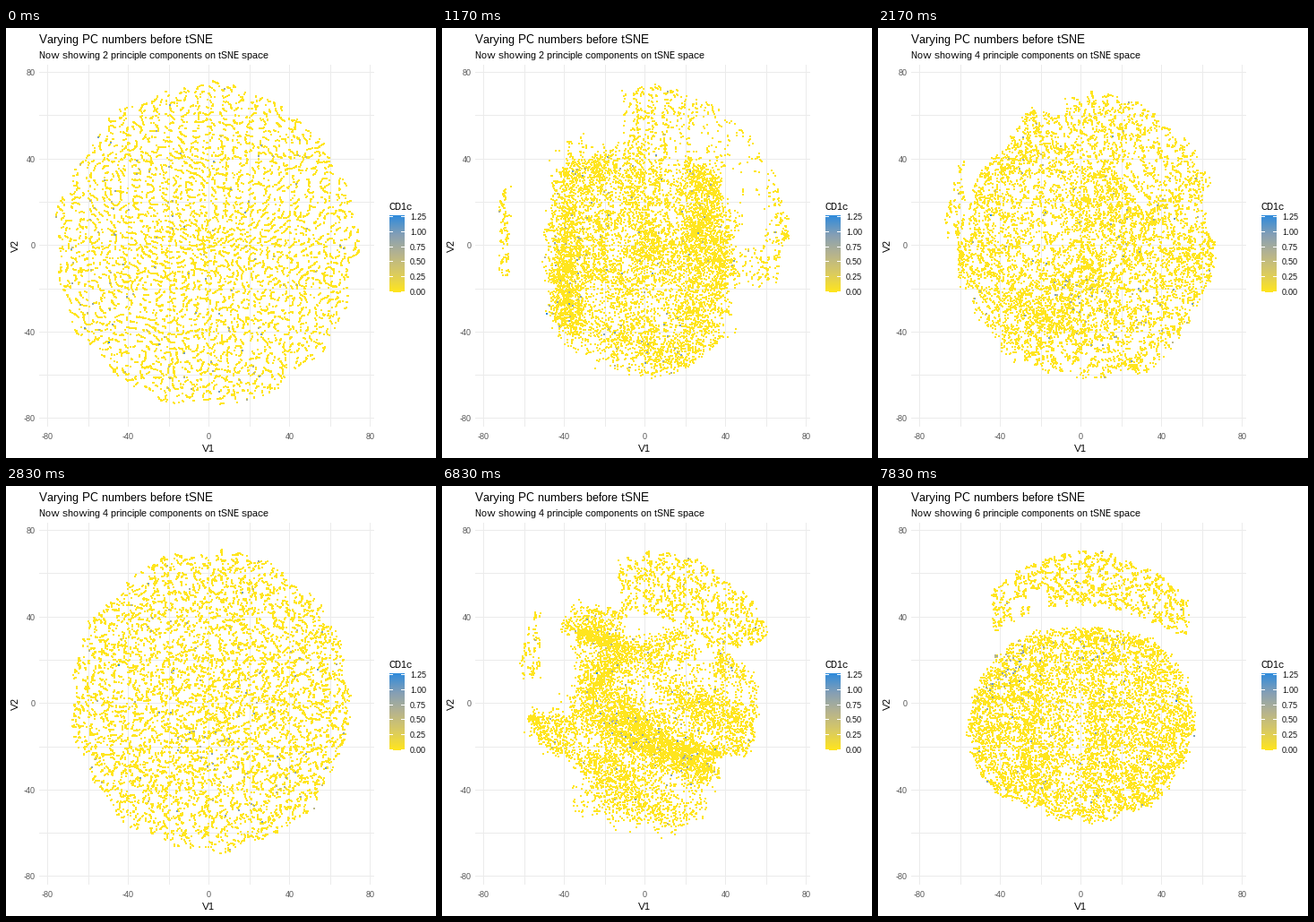
Write a matplotlib script that moves like this. It is 480 by 480 pixels and loops after 8 s.

```python
import numpy as np
import matplotlib.pyplot as plt
from matplotlib.animation import FuncAnimation
from matplotlib.colors import LinearSegmentedColormap

plt.rcParams.update({"font.family": "Liberation Sans",
                     "text.hinting": "native", "text.hinting_factor": 1})

PT = 0.9                      # points per pixel at 80 dpi
CELLS = 9500
FRAMES, INTERVAL = 400, 20
YELLOW, BLUE = "#FFE51E", "#2F8BDB"
SCALE = LinearSegmentedColormap.from_list(
    "expr", [YELLOW, "#D9CA62", "#B5B38F", "#859FB5", BLUE])
rng = np.random.default_rng(12)


# ---------- cell layouts ----------
def waves(k, m=30):
    """Random plane-wave field: returns a function giving value and gradient."""
    ang, phase = rng.uniform(0, 2 * np.pi, (2, m))
    kv = k * np.column_stack([np.cos(ang), np.sin(ang)])

    def field(p):
        u = p @ kv.T + phase
        return np.cos(u).sum(1), -np.sin(u) @ kv
    return field


def strands(n, inside, k, gap, jitter):
    """n points gathered on short curly strands within a region."""
    p = rng.uniform(-80, 80, (50000, 2))
    field, dash = waves(k), waves(0.9)
    for _ in range(7):
        v, g = field(p)
        step = g * (v / ((g ** 2).sum(1) + 1.5 * k * k))[:, None]
        p -= np.clip(step, -0.8, 0.8)
    p = p[inside(p) & (dash(p)[0] > gap)][:n]
    return p + rng.normal(0, jitter, p.shape)


def disc(cx, cy, rad):
    def inside(p):
        x, y = p[:, 0] - cx, p[:, 1] - cy
        a = np.arctan2(y, x)
        rough = 0.985 + 0.012 * np.cos(9 * a + cx) + 0.012 * np.cos(17 * a)
        return np.hypot(x, y) < rad * rough
    return inside


def dome(p, grow=1.0):
    return np.hypot(p[:, 0] / 63, (p[:, 1] + 9) / 50) < grow


def cap(p):
    x, y = p.T
    hole = np.hypot(x + 23, y - 48) < 6
    return (np.hypot(x - 2, y) < 70) & ~dome(p, 1.1) & (abs(x - 5) < 48) & (y > 33) & ~hole


def body(p):
    x, y = p.T
    split = (abs(x - 22) < 1.6) & (abs(y + 32) < 14)
    return dome(p) & ~split


def centred(p, power):
    r = np.hypot(*p.T)[:, None]
    return p * (r / r.max()) ** power


def match(wish, spots, slabs):
    """Hand out the spots so that each cell lands near its wish."""
    out = np.empty_like(spots)
    rows = np.array_split(np.argsort(wish[:, 0]), slabs)
    cols = np.array_split(np.argsort(spots[:, 0]), slabs)
    for i, j in zip(rows, cols):
        out[i[np.argsort(wish[i, 1])]] = spots[j[np.argsort(spots[j, 1])]]
    return out


def stir(p, pull, noise):
    """Whole patches of cells move off together, with tears in between."""
    drift = [np.tanh(waves(0.09)(p)[0] / 2) for _ in range(2)]
    return pull * p + 40 * np.column_stack(drift) + rng.normal(0, noise, p.shape)


four = centred(strands(CELLS, disc(1, 1, 70.5), 1.4, -1.8, 0.25), 0.1)
radius, angle = np.hypot(*four.T), np.degrees(np.arctan2(four[:, 1], four[:, 0]))
on_cap = ((radius > 40) & (angle > 25) & (angle < 97)) \
    | ((four[:, 0] < -57) & (four[:, 1] > 4))

two = centred(strands(CELLS, disc(-1, 0, 76), 1.2, -1.8, 0.12), 0.18)
wish = stir(four, -0.15, 2)
wish[on_cap] = four[on_cap]
two = match(wish, two, 60)

six = np.empty_like(four)
six[on_cap] = match(four[on_cap], strands(on_cap.sum(), cap, 1.15, -2.5, 0.4), 25)
six[~on_cap] = match(stir(four[~on_cap], -0.3, 6),
                     strands((~on_cap).sum(), body, 1.15, -2.5, 0.4), 60)


def bump(cx, cy, w):
    return np.exp(-((six - (cx, cy)) ** 2).sum(1) / w ** 2)


chance = 0.004 + 0.09 * bump(-42, 18, 10) + 0.06 * bump(-25, 30, 8) + 0.05 * bump(8, 27, 11)
lit = rng.random(CELLS) < chance
level = rng.uniform(0.35, 0.8, lit.sum()) + 0.2 * (rng.random(lit.sum()) > 0.9)


# ---------- plot ----------
def to_px(p):
    return np.round(np.column_stack([226.5 + 2.25 * p[:, 0], 242.3 - 2.414 * p[:, 1]]))


fig = plt.figure(figsize=(6, 6), dpi=80, facecolor="white")
ax = fig.add_axes([0, 0, 1, 1])
ax.axis("off")


def label(x, y, s, size, color="black", **kw):
    return ax.text(x, y, s, fontsize=size * PT, color=color, **kw)


def line(x, y, color):
    ax.plot(x, y, color=color, lw=PT, antialiased=False, snap=False,
            solid_capstyle="butt")


for v in range(-80, 81, 20):
    gx, gy = to_px(np.array([[v, v]]))[0] + 0.5
    line([gx, gx], [41, 445], "#EBEBEB")
    line([37, 411], [gy, gy], "#EBEBEB")
    if v % 40 == 0:
        label(gx, 459, v, 9, "#4D4D4D", ha="center")
        label(32.5, gy + 3.5, v, 9, "#4D4D4D", ha="right")

label(37, 17, "Varying PC numbers before tSNE", 13.2)
subtitle = label(37, 34, "", 11)
label(226, 473, "V1", 11, ha="center")
label(16, 243, "V2", 11, rotation=90, ha="right", va="center")

label(428, 203, "CD1c", 11)
ax.imshow(np.linspace(1, 0, 86)[:, None], cmap=SCALE, aspect="auto",
          extent=(428, 445, 295, 209), interpolation="nearest")
for i in range(6):
    y = np.floor(294.5 - 16.8 * i) + 0.5
    line([428, 431.5], [y, y], "white")
    line([441.5, 445], [y, y], "white")
    label(451, y + 3.5, f"{i / 4:.2f}", 9)
ax.set(xlim=(0, 480), ylim=(480, 0))

dots, = ax.plot([], [], "s", ms=2 * PT, mew=0, color=YELLOW, antialiased=False, zorder=3)
marked = ax.scatter(np.zeros(lit.sum()), np.zeros(lit.sum()), s=(2 * PT) ** 2, marker="s",
                    c=SCALE(level), linewidths=0, antialiaseds=False, zorder=4)


# ---------- motion ----------
def ease(k):
    u = min(max(k, 0), 8) / 8
    return 4 * u ** 3 if u < 0.5 else 1 - 4 * (1 - u) ** 3


def update(i):
    step = int((i * INTERVAL - 152) * 3 / 1000)   # three poses a second
    first, second = ease(step), ease(step - 17)
    if second > 0:
        p = four + (six - four) * second
    else:
        p = two + (four - two) * first
    px = to_px(p)
    dots.set_data(px[~lit].T)
    marked.set_offsets(px[lit])
    count = 2 + 2 * (first > 0.5) + 2 * (second > 0.5)
    subtitle.set_text(f"Now showing {count} principle components on tSNE space")
    return dots, marked, subtitle


anim = FuncAnimation(fig, update, frames=FRAMES, interval=INTERVAL,
                     repeat=True, repeat_delay=0)
plt.show()
```
